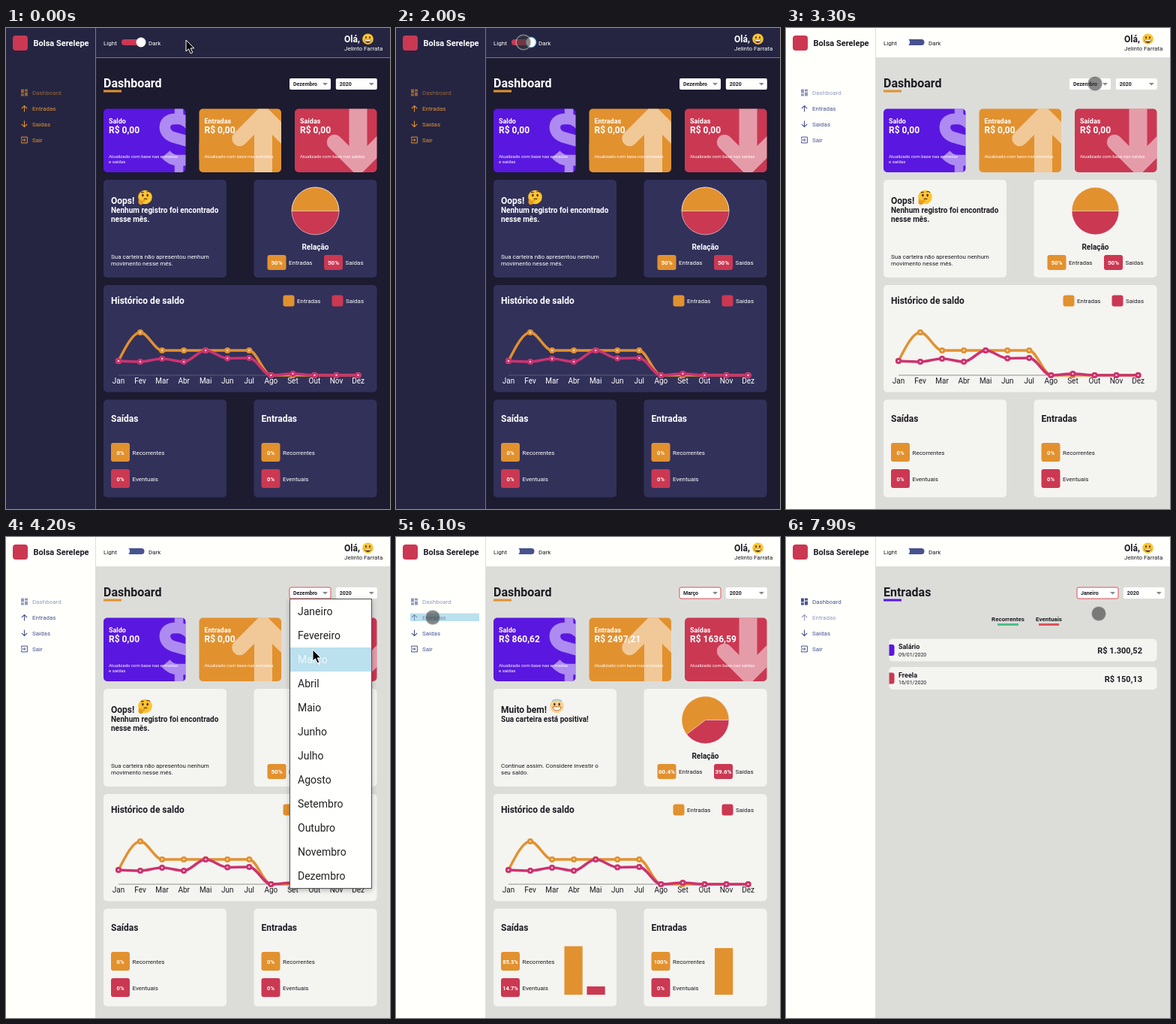
An HTML page for the animation above (8 s loop, 512 px wide and 640 px high).

```html
<!DOCTYPE html>
<html lang="pt">
<head>
<meta charset="utf-8">
<title>Painel</title>
<style>
html, body { margin: 0; height: 100%; overflow: hidden; }
svg { display: block; width: 100vw; height: 100vh; font-family: Roboto, sans-serif; }
</style>
</head>
<body>
<svg id="stage" viewBox="0 0 512 640"></svg>
<script>
const ORANGE = '#e2912f', RED = '#cb3852', PURPLE = '#5a17e0', PINK = '#cc3370', TAP = '#bbe0ee';
const DARK = { bg: '#1c1b30', bar: '#252542', card: '#32315a', text: '#fff', link: ORANGE, line: '#77778a', axis: '#66667c', track: RED };
const LIGHT = { bg: '#dcddd9', bar: '#fffffc', card: '#f4f4f1', text: '#1d1b22', link: '#47528f', line: '#dededa', axis: '#777', track: '#47528f' };
const MONTHS = ['Janeiro', 'Fevereiro', 'Março', 'Abril', 'Maio', 'Junho', 'Julho', 'Agosto', 'Setembro', 'Outubro', 'Novembro', 'Dezembro'];
const INCOME = [443, 405, 429, 429, 429, 429, 429, 462, 462, 462, 462, 462];
const SPENT = [443, 444, 440, 444, 429, 439.5, 439, 462, 460, 462, 462, 462];
const STEP = 29.05;

// time, x, y of the pointer
const POINTER = [
  [0, 240, 16], [100, 240, 16], [300, 223, 11], [600, 224, 11], [700, 205, 13], [800, 190, 14], [900, 190, 14],
  [1100, 177, 18], [1200, 177, 18], [1400, 170, 19], [2200, 170, 19], [2600, 298, 58], [2700, 298, 58],
  [3100, 402, 70], [3200, 402, 70], [3300, 412, 74], [3400, 412, 74], [3700, 402, 165], [3800, 402, 165],
  [4000, 409, 150], [4500, 409, 150], [4900, 250, 60], [5100, 90, 23], [5300, 34, 86], [5600, 49, 107],
  [6200, 49, 107], [6400, 130, 95], [6600, 229, 106], [6700, 229, 106], [7200, 411, 81], [7300, 411, 81],
  [7700, 417, 102], [8000, 417, 102]
];

let c = DARK;
const clamp = v => Math.min(1, Math.max(0, v));
const txt = (x, y, size, s, fill = c.text, weight = 400, anchor = 'start') =>
  `<text x="${x}" y="${y}" font-size="${size}" fill="${fill}" font-weight="${weight}" text-anchor="${anchor}">${s}</text>`;
const bold = (x, y, size, s, fill, anchor) => txt(x, y, size, s, fill, 700, anchor);
const box = (x, y, w, h, r, fill, more = '') =>
  `<rect x="${x}" y="${y}" width="${w}" height="${h}" rx="${r}" fill="${fill}" ${more}/>`;
const panel = (x, y, w, h) => box(x, y, w, h, 5, c.card);
const line = (d, color, width, more = '') =>
  `<path d="${d}" fill="none" stroke="${color}" stroke-width="${width}" ${more}/>`;

function pointerAt(t) {
  const i = POINTER.findIndex(p => p[0] > t), a = POINTER[i - 1], b = POINTER[i];
  const k = (t - a[0]) / (b[0] - a[0]);
  return [a[1] + (b[1] - a[1]) * k, a[2] + (b[2] - a[2]) * k];
}

const EYES = '<ellipse cx="-3.4" cy="-2.6" rx="1.3" ry="2"/><ellipse cx="3.4" cy="-2.6" rx="1.3" ry="2"/>';
const FACES = {
  grin: EYES + '<path d="M-6 1.5H6C6 9-6 9-6 1.5Z" fill="#5d2b13"/><path d="M-5 1.6H5V4H-5Z" fill="#fff"/>',
  think: EYES + line('M-6-6q2-2 4-.5M2-7.5q3-1.5 5 1M-2 3q3-1.5 5 0', '#5d2b13', 1.2)
    + '<path d="M-9 3q2-1 3 2l6-1q2 1 0 2l-3 1q1 4-4 4-4-1-2-8Z" fill="#e89a1c"/>',
  happy: line('M-7-7q7-4.500 14 0', '#9cc9dc', 2) + EYES + '<path d="M-6 1H6C6 8-6 8-6 1Z" fill="#fff" stroke="#b5652a"/>',
  silly: EYES + '<path d="M-6 1H5Q4 7-1 7-6 6-6 1Z" fill="#5d2b13"/><path d="M0 3h4v5q-2 2-4 0Z" fill="#e0525c"/>'
    + '<path d="M5-6q6 4 2 11Z" fill="#b5722a"/>'
};
const emoji = (x, y, r, kind) =>
  `<g transform="translate(${x} ${y}) scale(${r / 10})" fill="#4a2a14"><circle r="10" fill="${kind == 'happy' ? '#f7d491' : '#fbc530'}"/>${FACES[kind]}</g>`;

function menu(page, t) {
  const icons = [
    `<path d="M0 0h4v5H0ZM5 0h4v3H5ZM0 6h4v3H0ZM5 4h4v5H5Z" fill="${c.link}"/>`,
    line('M4.500 9V1M.8 4.700 4.500 1l3.700 3.700', c.link, 1.1),
    line('M4.500 0v8M.8 4.300 4.500 8l3.700-3.700', c.link, 1.1),
    line('M.6 3V.6h7.800v7.800H.6V6M0 4.500h5.500M4 2.700l1.800 1.800L4 6.300', c.link, 1)
  ];
  const tap = t >= 6000 && t < 6300;
  return (tap ? box(19, 101.5, 92, 10.5, 0, TAP) : '') + ['Dashboard', 'Entradas', 'Saídas', 'Sair'].map((s, i) => {
    const y = 86 + 21 * i, dim = i == page || (tap && i == 1);
    return `<g opacity="${dim ? .58 : 1}"><g transform="translate(20 ${y - 4.5})">${icons[i]}</g>${txt(35, y + 3, 8, s, c.link)}</g>`;
  }).join('');
}

function toggle(t) {
  const x = 180 - 21.5 * clamp((t - 2000) / 250);
  const glow = t >= 1900 && t < 2200 ? `<circle cx="${x}" cy="19" r="7.500" fill="#3bf" opacity=".65"/>` : '';
  return box(154, 15, 30.5, 8, 4, c.track) + glow + `<circle cx="${x}" cy="19" r="6.500" fill="#fff"/>`;
}

function frame(page, t) {
  return box(0, 0, 512, 640, 0, c.bg) + box(119, 0, 393, 39.5, 0, c.bar) + box(0, 0, 119.5, 640, 0, c.bar)
    + line('M119.500 0V640M119.500 39.500H512', c.line, 1)
    + box(9, 10, 20, 20, 4, RED) + bold(36.5, 24, 11, 'Bolsa Serelepe')
    + menu(page, t) + txt(130, 23, 8, 'Light') + toggle(t) + txt(190, 23, 8, 'Dark')
    + bold(451, 19, 12, 'Olá,') + emoji(482.5, 14.7, 7.3, 'grin') + txt(451, 30, 8, 'Jelinto Farrata');
}

function select(x, s, focus) {
  return box(x, 67, 55, 15, 2, '#fffffe', focus ? 'stroke="#dd4f5c"' : '')
    + bold(x + 5, 77, 7, s, '#1d1b22') + `<path d="M${x + 44} 73h7l-3.500 3.500Z" fill="#888"/>`;
}

function heading(title, color, x, month, focus) {
  return bold(130, 79, 16, title) + box(130, 82.5, 24, 3, 0, color) + select(x, month, focus) + select(x + 61.8, '2020');
}

function moneyCard(x, color, title, value, note, icon) {
  const lines = note.map((s, i) => txt(x + 7, 173 + 7 * i, 6, s, '#fff')).join('');
  return box(x, 107.5, 109.5, 84.5, 5, color) + `<g clip-path="url(#cards)" opacity=".5">${icon}</g>`
    + bold(x + 7, 127, 9, title, '#fff') + bold(x + 7, 140, 12, 'R$ ' + value.toFixed(2).replace('.', ','), '#fff') + lines;
}

const arrow = (x, flip) => `<g transform="translate(${x} 149.500) scale(1 ${flip})">`
  + line('M-31.500-2.500 0-34l31.500 31.500', '#fff', 20.5, 'stroke-linecap="round" stroke-linejoin="round"')
  + line('M0-30V50', '#fff', 24) + '</g>';
const dollar = line('M247 131q-8-10-18-10h-4c-17 0-17 19-3 24l21 6c15 5 14 25-3 25h-11q-9 0-16-8', '#fff', 14.5)
  + line('M230.600 100V118M230.600 180V198', '#fff', 11.6);

const badge = (x, y, w, h, color, s, size, label) => box(x, y, w, h, 3, color)
  + bold(x + w / 2, y + h / 2 + 3, size, s, '#fff', 'middle') + txt(x + w + 3.5, y + h / 2 + 3.3, 8, label);

function pie(share) {
  const a = share * 2 * Math.PI, r = 31.5, edge = 'stroke="#fff" stroke-opacity=".8" stroke-width=".7"';
  return `<g transform="translate(412.500 243.500)"><circle r="${r}" fill="${RED}" ${edge}/>
    <path d="M0 0H${r}A${r} ${r} 0 ${+(share > .5)} 0 ${r * Math.cos(a)} ${-r * Math.sin(a)}Z" fill="${ORANGE}" ${edge}/></g>`;
}

// monotone cubic through evenly spaced points
function curve(ys, color) {
  const last = ys.length - 1, rise = i => ys[i + 1] - ys[i], px = i => 150 + STEP * i;
  const mid = i => {
    const a = rise(i - 1), b = rise(i);
    return (Math.sign(a) + Math.sign(b)) * Math.min(Math.abs(a), Math.abs(b), Math.abs(a + b) / 4);
  };
  const slope = i => i == 0 ? (3 * rise(0) - mid(1)) / 2 : i == last ? (3 * rise(i - 1) - mid(i - 1)) / 2 : mid(i);
  let d = `M150 ${ys[0]}`;
  for (let i = 0; i < last; i++)
    d += `C${px(i) + STEP / 3} ${ys[i] + slope(i) / 3} ${px(i + 1) - STEP / 3} ${ys[i + 1] - slope(i + 1) / 3} ${px(i + 1)} ${ys[i + 1]}`;
  return line(d, color, 3.5)
    + ys.map((y, i) => `<circle cx="${px(i)}" cy="${y}" r="2.600" fill="#fff" stroke="${color}" stroke-width="3"/>`).join('');
}

function history() {
  const legend = (x, color, s) => box(x, 355.5, 15, 15, 3, color) + txt(x + 18.5, 366, 8, s);
  return panel(130, 342, 364.5, 142.5) + bold(140, 367, 12, 'Histórico de saldo')
    + legend(369.5, ORANGE, 'Entradas') + legend(434.5, RED, 'Saídas')
    + line(`M150 462H${150 + STEP * 11}`, c.axis, .8)
    + MONTHS.map((m, i) => txt(150 + STEP * i, 473, 10, m.slice(0, 3), c.text, 400, 'middle')).join('')
    + curve(INCOME, ORANGE) + curve(SPENT, PINK);
}

function split(x, title, shares, heights, grow) {
  const bars = heights.map((h, i) => box(x + 94.5 + 30 * i, 609 - h * grow, 24.2, h * grow, 0, [ORANGE, RED][i])).join('');
  return panel(x, 494.5, 164, 130) + bold(x + 10, 524, 12, title)
    + badge(x + 10, 552, 25, 25, ORANGE, shares[0], 7.5, 'Recorrentes')
    + badge(x + 10, 587, 25, 25, RED, shares[1], 7.5, 'Eventuais') + bars;
}

function dashboard(t) {
  const full = t >= 4500, k = clamp((t - 4500) / 1500);
  const grow = 1 - (1 - k) ** 3, count = k < 1 ? 1 - 2 ** (-10 * k) : 1;
  const note = 'Atualizado com base nas ';
  const message = full
    ? bold(140, 234, 12, 'Muito bem!') + emoji(214.5, 225, 9.3, 'happy') + bold(140, 246, 10, 'Sua carteira está positiva!')
      + txt(140, 307, 8, 'Continue assim. Considere investir o') + txt(140, 316, 8, 'seu saldo.')
    : bold(140, 234, 12, 'Oops!') + emoji(185.5, 225, 9.3, 'think') + bold(140, 246, 10, 'Nenhum registro foi encontrado')
      + bold(140, 258, 10, 'nesse mês.') + txt(140, 307, 8, 'Sua carteira não apresentou nenhum') + txt(140, 316, 8, 'movimento nesse mês.');
  return frame(0, t) + heading('Dashboard', ORANGE, 378, full ? 'Março' : 'Dezembro', t >= 3400)
    + '<clipPath id="cards">' + [130, 257.5, 385].map(x => box(x, 107.5, 109.5, 84.5, 5, '#000')).join('') + '</clipPath>'
    + moneyCard(130, PURPLE, 'Saldo', 860.62 * count, [note + 'entradas', 'e saídas'], dollar)
    + moneyCard(257.5, ORANGE, 'Entradas', 2497.21 * count, [note + 'entradas'], arrow(343, 1))
    + moneyCard(385, RED, 'Saídas', 1636.59 * count, [note + 'saídas'], arrow(469.5, -1))
    + panel(130, 202, 164, 130) + message
    + panel(330.5, 202, 164, 130) + pie(.5 + .104 * grow) + bold(412.5, 295, 10, 'Relação', c.text, 'middle')
    + badge(348.5, 302, 25, 20, ORANGE, full ? '60.4%' : '50%', 8, 'Entradas')
    + badge(424, 302, 25, 20, RED, full ? '39.6%' : '50%', 8, 'Saídas')
    + history()
    + split(130, 'Saídas', full ? ['85.3%', '14.7%'] : ['0%', '0%'], [64.5, 11], grow)
    + split(330.5, 'Entradas', full ? ['100%', '0%'] : ['0%', '0%'], [62], grow);
}

function entry(y, color, name, date, value) {
  return panel(137.5, y, 357, 30) + `<path d="M137.500 ${y + 7.5}h4q3 0 3 3v9q0 3-3 3h-4Z" fill="${color}"/>`
    + bold(150, y + 13.5, 9, name) + txt(150, y + 23.3, 7, date) + bold(475, y + 19.5, 11, value, c.text, 'end');
}

function entries(t) {
  const found = t >= 7900;
  return frame(1, t) + heading('Entradas', PURPLE, 388, found ? 'Janeiro' : 'Dezembro', t >= 7400)
    + bold(296, 112, 8, 'Recorrentes', c.text, 'middle') + box(282, 115, 28, 3, 0, '#4cc088')
    + bold(350.5, 112, 8, 'Eventuais', c.text, 'middle') + box(337, 115, 27, 3, 0, '#e0525c')
    + (found
      ? entry(135.5, PURPLE, 'Salário', '09/01/2020', 'R$ 1.300,52') + entry(173, RED, 'Freela', '16/01/2020', 'R$ 150,13')
      : panel(137.5, 148, 357, 74) + txt(231, 189, 12, 'Nenhum registro encontrado') + emoji(394, 184.5, 7.3, 'silly'));
}

function popup(x, chosen) {
  return box(x, 82.5, 109, 385, 0, '#fffffe', 'stroke="#555" style="filter:drop-shadow(0 2px 3px #0004)"')
    + MONTHS.map((m, i) => (i == chosen ? box(x + .5, 83 + 32 * i, 108, 32, 0, TAP) : '')
      + txt(x + 10.5, 104 + 32 * i, 14, m, i == chosen ? '#eef8fb' : '#222')).join('');
}

function pointer(t, isArrow) {
  const [x, y] = pointerAt(t);
  return isArrow
    ? `<path transform="translate(${x} ${y})" d="M0 0V15l3.500-3.200 2.600 6 2.700-1.200-2.600-5.700h4.600Z" stroke="#fff"/>`
    : `<circle cx="${x}" cy="${y}" r="9.800" fill="#373737" fill-opacity=".6" stroke="#ddd" stroke-opacity=".5" stroke-width="1.500"/>`;
}

function scene(t) {
  c = t < 2100 ? DARK : LIGHT;
  const first = t >= 3400 && t < 4500, second = t >= 7400 && t < 7900;
  return (t >= 4500 && t >= 6200 ? entries(t) : dashboard(t))
    + (first ? popup(378.5, t < 4200 ? 11 : 2) : second ? popup(388.5, t < 7600 ? 11 : 0) : '')
    + pointer(t, t < 200 || first || second);
}

const stage = document.getElementById('stage');
const start = performance.now();
let shown = -1;
function tick() {
  const t = Math.floor((performance.now() - start) % 8000 / 100) * 100; // the picture moves ten times a second
  if (t != shown) stage.innerHTML = scene(shown = t);
  requestAnimationFrame(tick);
}
tick();
</script>
</body>
</html>
```
